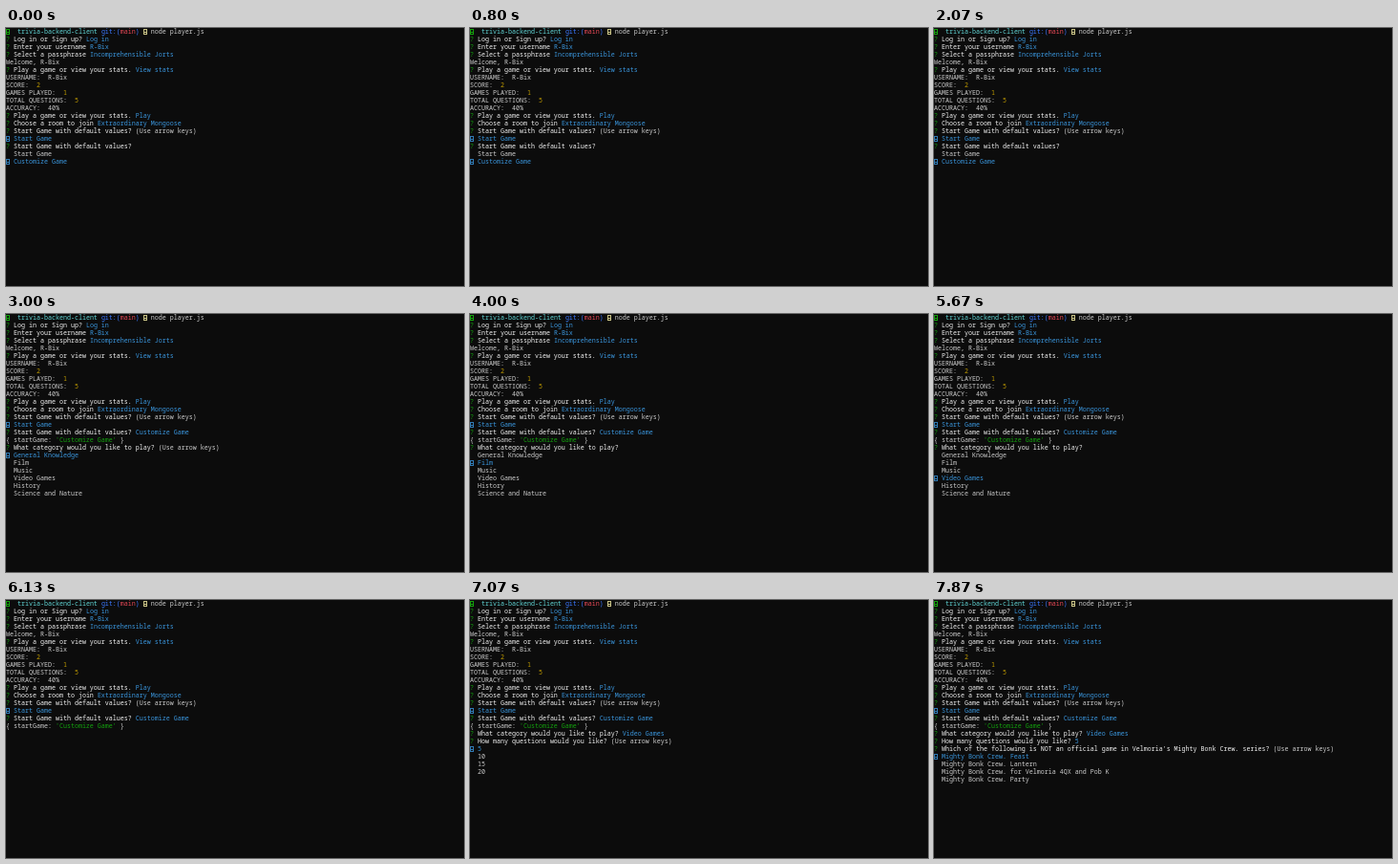
These frames come from a looping animation (480x270 px, 8 s). An HTML page:

```html
<!DOCTYPE html>
<html lang="en">
<head>
<meta charset="utf-8">
<title>Trivia terminal</title>
<style>
html, body { margin: 0; width: 100%; height: 100%; overflow: hidden; background: #0c0c0c; }
pre { margin: 0; color: #ccc; font: 6.6667px/8px "Noto Sans Mono", "DejaVu Sans Mono", monospace; }
pre div { height: 8px; }
.ask { color: #f2f2f2; }
.blue { color: #3a96dd; }
.green { color: #13a10e; }
.lime { color: #16c60c; }
.cyan { color: #61d6d6; }
.git { color: #3b78ff; }
.red { color: #e74856; }
.gold { color: #c19c00; }
.cream { color: #f9f1a5; }
i { display: inline-block; box-sizing: border-box; width: 4px; height: 6px; vertical-align: -1px;
  border: 1px solid; opacity: .8; background: linear-gradient(currentColor, currentColor) center / 2px 1px no-repeat; }
</style>
</head>
<body>
<pre id="screen"></pre>
<script>
const LOOP = 8000;
const paint = (name, text) => `<span class="${name}">${text}</span>`;
const box = '<i></i>';
const hint = '(Use arrow keys)';
const ask = (question, answer = '') => `${paint('green', '?')} ${paint('ask', question)} ${answer}`;
const reply = (question, answer) => ask(question, paint('blue', answer));
const stat = (label, value) => `${label}:  ${value}`;
const num = value => paint('gold', value);
const menu = (items, chosen) =>
  items.map((item, i) => i === chosen ? paint('blue', `${box} ${item}`) : `  ${item}`);

const playOrStats = 'Play a game or view your stats.';
const defaults = 'Start Game with default values?';
const category = 'What category would you like to play?';
const amount = 'How many questions would you like?';
const trivia = "Which of the following is NOT an official game in Velmoria's Mighty Bonk Crew. series?";

const modes = ['Start Game', 'Customize Game'];
const topics = ['General Knowledge', 'Film', 'Music', 'Video Games', 'History', 'Science and Nature'];
const amounts = ['5', '10', '15', '20'];
const games = ['Feast', 'Lantern', 'for Velmoria 4QX and Pob K', 'Party'].map(g => `Mighty Bonk Crew. ${g}`);

const history = [
  `${paint('lime', box)}  ${paint('cyan', 'trivia-backend-client')} ${paint('git', 'git:(')}${paint('red', 'main')}${paint('git', ')')} ${paint('cream', box)} node player.js`,
  reply('Log in or Sign up?', 'Log in'),
  reply('Enter your username', 'R-Bix'),
  reply('Select a passphrase', 'Incomprehensible Jorts'),
  'Welcome, R-Bix',
  reply(playOrStats, 'View stats'),
  stat('USERNAME', 'R-Bix'),
  stat('SCORE', num(2)),
  stat('GAMES PLAYED', num(1)),
  stat('TOTAL QUESTIONS', num(5)),
  stat('ACCURACY', '40%'),
  reply(playOrStats, 'Play'),
  reply('Choose a room to join', 'Extraordinary Mongoose'),
  ask(defaults, hint),
  paint('blue', `${box} Start Game`)
];
const custom = [
  reply(defaults, 'Customize Game'),
  `{ startGame: ${paint('green', "'Customize Game'")} }`
];
const themed = [...custom, reply(category, 'Video Games')];
const counted = [...themed, reply(amount, '5')];

const pickMode = i => [ask(defaults), ...menu(modes, i)];
const pickTopic = (i, note) => [...custom, ask(category, note), ...menu(topics, i)];

// [start time in ms, lines below the history]
const steps = [
  [0, pickMode(1)],
  [270, pickMode(0)],
  [730, pickMode(1)],
  [1070, pickMode(0)],
  [1470, pickMode(1)],
  [3000, pickTopic(0, hint)],
  [4000, pickTopic(1)],
  [4270, pickTopic(2)],
  [5530, pickTopic(3)],
  [6130, custom],
  [6200, [...themed, ask(amount, hint), ...menu(amounts, 0)]],
  [7470, counted],
  [7870, [...counted, ask(trivia, hint), ...menu(games, 0)]]
];

const screen = document.getElementById('screen');
const began = performance.now();
let shown;

function draw() {
  const time = (performance.now() - began) % LOOP;
  const step = steps.findLast(([start]) => start <= time);
  if (step !== shown) {
    shown = step;
    screen.innerHTML = [...history, ...step[1]].map(line => `<div>${line}</div>`).join('');
  }
  requestAnimationFrame(draw);
}
draw();
</script>
</body>
</html>
```
